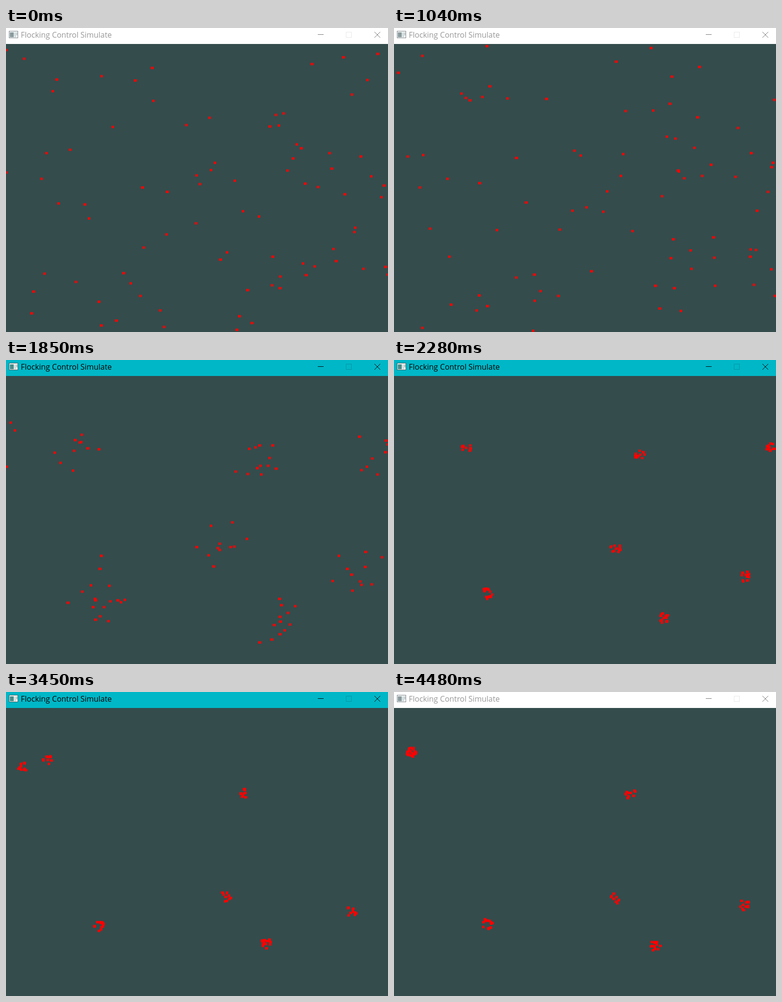
These frames come from a looping animation (789x628 px, 4510 ms). An HTML page with a canvas:

```html
<!DOCTYPE html>
<html lang="en">
<head>
<meta charset="utf-8">
<title>Flocking Control Simulate</title>
<style>
  html, body { margin: 0; width: 100%; height: 100%; overflow: hidden; }
  canvas { display: block; }
</style>
</head>
<body>
<canvas id="stage" width="789" height="628"></canvas>
<script>
const ctx = document.getElementById('stage').getContext('2d');
const W = 789, H = 628, BAR = 33, FIELD = H - BAR, LOOP = 4510;
const DOTS = 84, RADIUS = 11, GATHER_START = 1200, GATHER_TIME = 1000;

// Centre of each flock at the key times; x may pass the right edge and wraps
const KEY_TIMES = [2280, 3000, 3930, 4480];
const FLOCKS = [
  [[149, 182], [128, 150], [40, 131], [36, 125]],
  [[509, 198], [495, 211], [495, 211], [489, 211]],
  [[779, 180], [819, 177], [829, 131], [825, 125]],
  [[458, 389], [452, 419], [456, 427], [455, 428]],
  [[192, 483], [189, 485], [192, 481], [193, 479]],
  [[726, 448], [714, 456], [711, 452], [724, 440]],
  [[556, 533], [537, 514], [536, 525], [540, 525]]
];

let seed = 11;
const random = () => (seed = (seed * 16807) % 2147483647) / 2147483647;
const lerp = (a, b, p) => a + (b - a) * p;
const clamp = p => Math.min(1, Math.max(0, p));
const smooth = p => p * p * (3 - 2 * p);
const wrap = (v, size) => ((v % size) + size) % size;
// Shortest signed way from b to a on a field that wraps around
const gap = (a, b, size) => wrap(a - b + size / 2, size) - size / 2;

// Each dot starts anywhere and belongs to the nearest flock
function makeDot() {
  const x = random() * W, y = BAR + random() * FIELD;
  const options = FLOCKS.map(path => {
    const [cx, cy] = path[0];
    const dx = gap(x, cx, W), dy = gap(y, cy, FIELD);
    return { path, x: cx + dx, y: cy + dy, distance: Math.hypot(dx, dy) };
  });
  const nearest = options.reduce((a, b) => b.distance < a.distance ? b : a);
  return {
    ...nearest,
    heading: random() * Math.PI * 2,
    speed: 0.04 + random() * 0.03,
    orbit: RADIUS * Math.sqrt(random()),
    angle: random() * Math.PI * 2,
    spin: (random() - 0.5) / 300,
    size: random() < 0.4 ? 6 : 5
  };
}
const dots = Array.from({ length: DOTS }, makeDot);

function centreAt(path, t) {
  let k = 0;
  while (k < KEY_TIMES.length - 2 && t > KEY_TIMES[k + 1]) k++;
  const p = clamp((t - KEY_TIMES[k]) / (KEY_TIMES[k + 1] - KEY_TIMES[k]));
  return path[k].map((v, i) => lerp(v, path[k + 1][i], p));
}

function drawDot(dot, t) {
  const [cx, cy] = centreAt(dot.path, t);
  const gather = smooth(clamp((t - GATHER_START) / GATHER_TIME));
  const drift = dot.speed * t;
  const angle = dot.angle + dot.spin * t;
  const x = lerp(dot.x + drift * Math.cos(dot.heading), cx + dot.orbit * Math.cos(angle), gather);
  const y = lerp(dot.y + drift * Math.sin(dot.heading), cy + dot.orbit * Math.sin(angle), gather);
  rect('#f00', Math.round(wrap(x, W) - dot.size / 2),
    Math.round(BAR + wrap(y - BAR, FIELD) - dot.size / 2), dot.size, 5);
}

function rect(color, x, y, w, h) {
  ctx.fillStyle = color;
  ctx.fillRect(x, y, w, h);
}

function line(color, x1, y1, x2, y2) {
  ctx.strokeStyle = color;
  ctx.beginPath();
  ctx.moveTo(x1, y1);
  ctx.lineTo(x2, y2);
  ctx.stroke();
}

function drawTitleBar(active) {
  const ink = active ? '#000' : '#777';
  const iconInk = active ? '#4b8c88' : '#8b9a9e';
  rect(active ? '#00b7c7' : '#fff', 0, 0, W, BAR);

  rect(active ? '#3f5c60' : '#7d868c', 6, 6, 19, 15);
  rect('#f4f6f6', 7, 7, 17, 13);
  rect(iconInk, 8, 9, 8, 10);
  rect('#cfdcdc', 17, 9, 4, 10);
  rect(iconInk, 22, 9, 1, 6);

  ctx.font = '15.9px "Open Sans", sans-serif';
  ctx.fillStyle = active ? '#000' : '#999';
  ctx.fillText('Flocking Control Simulate', 30.6, 20);

  line(ink, 644, 13.5, 656, 13.5);
  ctx.strokeStyle = active ? '#0097a4' : '#e8e8e8';
  ctx.strokeRect(702.5, 8.5, 11, 11);
  line(ink, 761, 8, 773, 20);
  line(ink, 773, 8, 761, 20);
}

function draw() {
  const t = performance.now() % LOOP;
  rect('#344c4c', 0, BAR, W, FIELD);
  dots.forEach(dot => drawDot(dot, t));
  drawTitleBar(t >= 1320 && t < 4450);
  requestAnimationFrame(draw);
}
draw();
</script>
</body>
</html>
```
